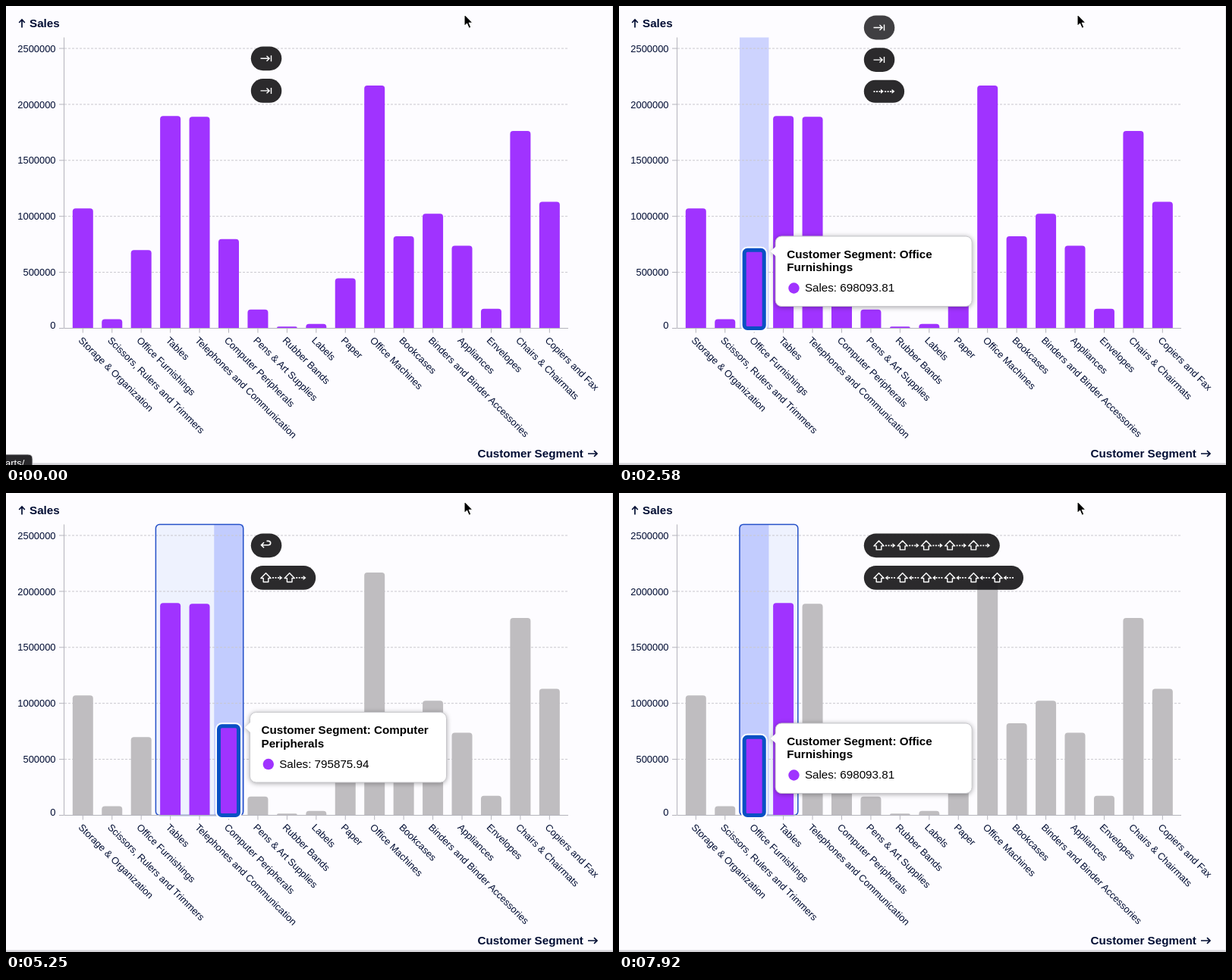
These frames come from a looping animation (800 px wide and 606 px high, 8000 ms). An HTML page:

```html
<!DOCTYPE html>
<html lang="en">
<head>
<meta charset="utf-8">
<title>Keyboard navigation of a bar chart</title>
<style>
  html, body { margin: 0; width: 100%; height: 100%; overflow: hidden; background: #fdfcff; }
  svg { display: block; width: 800px; height: 606px; }
  text { font-family: "Liberation Sans", Arial, sans-serif; font-size: 15.2px; fill: #000d33; }
  .tick { font-size: 12.9px; }
  .bold { font-weight: bold; }
  .tip text { fill: #000; }
  .shadow { filter: drop-shadow(0 1px 3px #0005); }
  .glyph { fill: none; stroke: #fff; stroke-width: 1.4; }
</style>
</head>
<body>
<svg id="stage" viewBox="0 0 800 606"></svg>
<script>
const LOOP = 8000;
const BASE = 425.5, TOP = 41.5, STEP = 38.44, BAR = 27;
const BLUE = '#0a50c4', PURPLE = '#a033ff', GREY = '#bfbdc0';
const HOLD = 1800, FADE = 300;

// "|" marks where the tooltip title wraps
const data = [
  ['Storage &|Organization', 1070182.61], ['Scissors,|Rulers and Trimmers', 80996.31],
  ['Office|Furnishings', 698093.81], ['Tables', 1896007.86],
  ['|Telephones and|Communication', 1889313.79], ['Computer|Peripherals', 795875.94],
  ['Pens & Art|Supplies', 167107.22], ['Rubber|Bands', 15006.63], ['Labels', 38981.53],
  ['Paper', 446452.89], ['Office|Machines', 2168697.14], ['Bookcases', 822652.04],
  ['Binders and|Binder Accessories', 1022957.59], ['Appliances', 736991.54],
  ['Envelopes', 174085.94], ['Chairs &|Chairmats', 1761836.55], ['Copiers and|Fax', 1130361.32],
].map(([title, sales]) => ({ title: title.replace('&', '&amp;'), sales }));

// Each pill collects the repeated presses of one key
const pills = [
  { key: 'tab', times: [-1200] },
  { key: 'tab', times: [-200] },
  { key: 'tab', times: [750] },
  { key: 'tab', times: [1450] },
  { key: 'right', times: [2000, 2400, 3000] },
  { key: 'enter', times: [3600] },
  { key: 'shiftRight', times: [4500, 4900, 5300, 5700, 6150] },
  { key: 'shiftLeft', times: [6550, 6900, 7150, 7350, 7550, 7750] },
];
const RING_ON = 750, ENTER_CHART = 1450, SELECT = 3600, EXTEND = 4500, ANCHOR = 3;

const centre = i => 101.3 + STEP * i;
const yOf = value => BASE - value * 147.8e-6;
const presses = (key, t) =>
  pills.filter(p => p.key === key).flatMap(p => p.times).filter(time => time <= t).length;

const rect = (x, y, w, h, attrs) => `<rect x="${x}" y="${y}" width="${w}" height="${h}" ${attrs}/>`;
const path = (d, attrs = '') => `<path d="${d}" ${attrs}/>`;
const text = (x, y, str, attrs = '') => `<text x="${x}" y="${y}" ${attrs}>${str}</text>`;

function axes() {
  let out = '';
  for (let value = 0; value <= 2500000; value += 500000) {
    const y = yOf(value);
    out += text(65.5, (value ? y : 421.5) + 4.6, value, 'class="tick" text-anchor="end"');
    out += path(`M70 ${y}H76`, 'stroke="#b4b4bc"');
  }
  data.forEach((d, i) => {
    const x = centre(i);
    out += path(`M${x} ${BASE}v6`, 'stroke="#b4b4bc"');
    out += text(0, 0, d.title.replaceAll('|', ' ').trim(),
      `style="font-size:12.8px" transform="translate(${x - 6.6} 442.2) rotate(45)"`);
  });
  const arrow = 'fill="none" stroke="#000d33" stroke-width="1.7"';
  return out + path(`M76.5 ${TOP}V${BASE}H741`, 'fill="none" stroke="#b4b4bc"')
    + path('M21 28.5V18.5M17.2 22 21 18 24.8 22', arrow) + text(31, 28, 'Sales', 'class="bold"')
    + text(621.5, 596.3, 'Customer Segment', 'class="bold"')
    + path('M767 591H778.5M775 587.2 779 591 775 594.8', arrow);
}

function grid() {
  let out = '';
  for (let value = 500000; value <= 2500000; value += 500000)
    out += path(`M77 ${yOf(value)}H741`, 'stroke="#c9c8ce" stroke-dasharray="3 2"');
  return out;
}

function bar(i, fill) {
  const x = centre(i) - BAR / 2, y = yOf(data[i].sales), r = Math.min(4, BASE - y);
  return path(`M${x} ${BASE}V${y + r}q0 ${-r} ${r} ${-r}h${BAR - 2 * r}q${r} 0 ${r} ${r}V${BASE}z`, `fill="${fill}"`);
}

function focusRing(i) {
  const y = yOf(data[i].sales);
  const ring = (grow, fill) => rect(centre(i) - 13 - grow, y - grow, 26 + 2 * grow, BASE - y + 2 * grow,
    `rx="${4 + grow}" ${fill}`);
  return ring(3.5, 'fill="none" stroke="#fff" stroke-width="2"')
    + ring(0, `fill="${PURPLE}" stroke="${BLUE}" stroke-width="5"`);
}

function tooltip(i) {
  const { title, sales } = data[i];
  const lines = ('Customer Segment: ' + title).split('|');
  const x = centre(i) + 28, y = yOf(sales) - 18.3;
  const w = lines.length > 1 ? 259 : 227, h = 57.5 + 17.5 * lines.length;
  const salesY = y + 38 + 17.5 * lines.length;
  return '<g class="tip"><g class="shadow">'
    + rect(x, y, w, h, 'rx="8" fill="#fff" stroke="#c8c8cc"')
    + path(`M${x + 1} ${y + 13}l-7.5 7 7.5 7z`, 'fill="#fff"') + '</g>'
    + lines.map((line, n) => text(x + 15, y + 28.7 + 17.5 * n, line, 'class="bold"')).join('')
    + `<circle cx="${x + 24.3}" cy="${salesY - 4.5}" r="7.2" fill="${PURPLE}"/>`
    + text(x + 38.7, salesY, 'Sales: ' + sales.toFixed(2)) + '</g>';
}

// Key glyphs, drawn from their left end on the pill's middle line
const dottedArrow = (x, y, dir) =>
  `<g transform="translate(${x + 7} ${y}) scale(${dir} 1)">`
  + path('M-6.5 0H3', 'class="glyph" stroke-dasharray="2 1.5" style="stroke-width:1.8"')
  + path('M3 -3 6.8 0 3 3z', 'fill="#fff"') + '</g>';
const shift = (x, y) =>
  path(`M${x + 7} ${y - 6.2}l6.6 6.8h-3.3v5h-6.6v-5h-3.3z`, 'class="glyph" stroke-linejoin="round"');

function glyphs(key, count, y) {
  const x = 335.5;
  if (key === 'tab')
    return path(`M${x} ${y}h11.5M${x + 8} ${y - 3.4}l3.6 3.4-3.6 3.4M${x + 14} ${y - 4}v8`, 'class="glyph"');
  if (key === 'enter')
    return path(`M${x + 4.5} ${y - 4}l-3.5 3.5 3.5 3.5M${x + 1} ${y - .5}h9q3.2 0 3.2-2.7t-3.2-2.7h-2`, 'class="glyph" style="stroke-width:1.6"');
  let out = '';
  for (let n = 0; n < count; n++) {
    if (key === 'right') out += dottedArrow(x - .5 + 14.6 * n, y, 1);
    else out += shift(x + 31.2 * n, y) + dottedArrow(x + 15 + 31.2 * n, y, key === 'shiftRight' ? 1 : -1);
  }
  return out;
}

function pillStack(t) {
  let bottom = 127.8, out = '';
  for (const { key, times } of [...pills].reverse()) {
    const past = times.filter(time => time <= t), count = past.length;
    if (!count) continue;
    const opacity = Math.min(1, 1 - (t - past[count - 1] - HOLD) / FADE);
    const h = key === 'right' ? 30 : 31.8;
    const w = key === 'right' ? Math.max(40.5, 24.5 + 14.4 * count)
      : key.startsWith('shift') ? 23 + 31.2 * count : 40.5;
    if (opacity > 0)
      out += `<g opacity="${opacity}">` + rect(322.8, bottom - h, w, h, `rx="${h / 2}" fill="#1b1a1d" fill-opacity=".93"`)
        + glyphs(key, count, bottom - h / 2) + '</g>';
    bottom -= h + 10.8;
  }
  return out;
}

const frame = rect(0, 0, 800, 606, 'fill="#fdfcff"')
  + path('M799.5 0V606', 'stroke="#e4e3e8"') + path('M0 603.5H800', 'stroke="#e4e3e8"')
  + path('M0 605H800', 'stroke="#a9a8ad"');
const cursor = path('M604 10.8V26.6L607.5 23.3 610.2 29.4 612.9 28.2 610.3 22.2H615z',
  'fill="#000" stroke="#fff" stroke-width="1.1" stroke-linejoin="round"');
const linkStatus = path('M-2 592H29q6 0 6 6V608H-2z', 'fill="#29282b" stroke="#d5d4d9"')
  + text(-1, 608, 'arts/', 'style="fill:#fff;font-size:13px"');
const chartRing = rect(15.5, 14.5, 765, 586, `rx="4" fill="none" stroke="${BLUE}" stroke-width="2"`);
const staticGrid = grid(), staticAxes = axes();

function scene(t) {
  const inside = t >= ENTER_CHART, selected = t >= SELECT;
  const index = presses('right', t) + presses('shiftRight', t) - presses('shiftLeft', t);
  const showTip = inside && (!selected || t >= EXTEND);
  const low = Math.min(ANCHOR, index), high = Math.max(ANCHOR, index);
  const column = (from, to, attrs) =>
    rect(centre(from) - STEP / 2, TOP, STEP * (to - from + 1), BASE - TOP, attrs);

  let out = frame;
  if (selected) out += column(low, high, 'rx="5" fill="#eef2fe"');
  if (showTip) out += column(index, index, 'fill="#4a66fa" fill-opacity=".27"');
  out += staticGrid;
  if (selected) out += column(low, high, 'rx="5" fill="none" stroke="#2450c8" stroke-width="1.5"');
  out += data.map((d, i) => bar(i, selected && (i < low || i > high) ? GREY : PURPLE)).join('');
  out += staticAxes;
  if (inside) out += focusRing(index);
  if (t >= RING_ON && !inside) out += chartRing;
  if (showTip) out += tooltip(index);
  if (t < RING_ON) out += linkStatus;
  return out + pillStack(t) + cursor;
}

const stage = document.getElementById('stage');
let shown = '';
function draw() {
  const next = scene(performance.now() % LOOP);
  if (next !== shown) stage.innerHTML = shown = next;
  requestAnimationFrame(draw);
}
draw();
</script>
</body>
</html>
```
